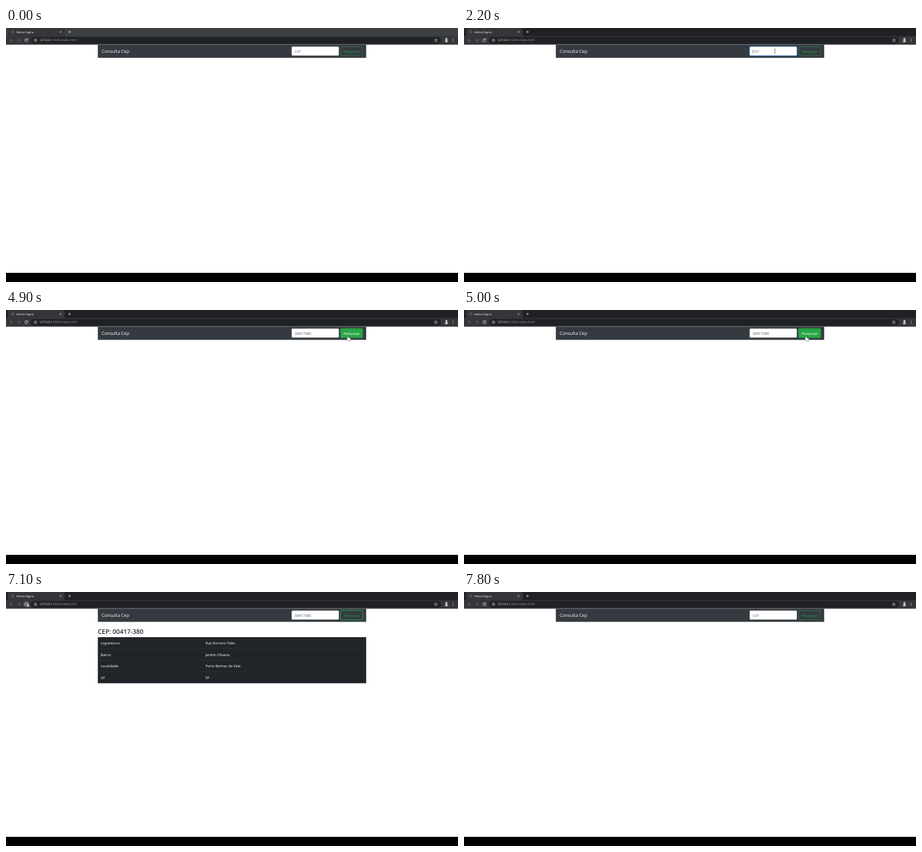
These frames come from a looping animation (690x388 px, 8700 ms). An HTML page:

```html
<!DOCTYPE html>
<html lang="pt-BR">
<head>
<meta charset="utf-8">
<title>Minha Pagina</title>
<style>
  html, body { margin: 0; width: 100%; height: 100%; overflow: hidden; background: #fff; }
  svg { display: block; width: 690px; height: 388px; }
  text { font: 5.45px "Open Sans", "Noto Sans", sans-serif; fill: #fff; text-rendering: geometricPrecision; white-space: pre; }
  .line { fill: none; stroke: #e8eaed; stroke-width: .6; }
  .dim { stroke: #77797d; }
  #strip { fill: #3c4043; }
  #controls { stroke: #85888c; }
  .active #strip { fill: #202124; }
  .active #controls { stroke: #fff; }
  #field { fill: #fff; stroke: #ced4da; stroke-width: .36; }
  #field.focus { stroke: #80bdff; }
  #button { fill: none; stroke: #28a745; stroke-width: .45; }
  #label { fill: #28a745; text-anchor: middle; }
  .hover #button { fill: #28a745; }
  .hover #label { fill: #fff; }
</style>
</head>
<body>
<svg id="stage" viewBox="0 0 690 388">
  <rect width="690" height="388" fill="#fff"/>
  <rect y="374" width="690" height="14" fill="#000"/>

  <rect id="strip" width="690" height="13"/>
  <path d="M1 12.4Q3 12.4 3 10V2.5Q3 0 5.500 0H87Q89.500 0 89.500 2.500V10Q89.500 12.400 91.500 12.400H690V25.500H0V12.400Z" fill="#35363a"/>
  <circle cx="10.200" cy="6" r="2" class="line dim"/>
  <path d="M8.800 7.300L11.600 4.700" class="line dim"/>
  <text x="16" y="7.600" style="font-size:4.12px">Minha Pagina</text>
  <path d="M82 4.700l2.700 2.700m0-2.700l-2.700 2.700M97 4v4m-2-2h4" class="line"/>
  <path id="controls" d="M646.300 5.700h3.600M663.400 4.300h3v3h-3zM664.300 4.300v-.900h3v3h-.900M680.200 4l3.400 3.400m0-3.400l-3.400 3.400" class="line" style="stroke-width:.5;stroke:inherit"/>

  <rect x="37.800" y="13.800" width="626" height="10" rx="5" fill="#202124"/>
  <path d="M11 18.700H6m2.300-2.300L6 18.700l2.300 2.300M17 18.700h5m-2.300-2.300l2.300 2.300-2.300 2.300" class="line dim"/>
  <circle id="reloadHover" cx="31" cy="18.700" r="4.900" fill="#505155"/>
  <path d="M32.700 17.300A2.200 2.200 0 1 0 33.100 19.400M33.200 16.400v1.700h-1.700" class="line" style="stroke-width:.8"/>
  <circle cx="45" cy="18.700" r="2" class="line"/>
  <path d="M45 18.400v1.400m0-2.500v.500" class="line"/>
  <text x="51" y="20.400" style="font-size:4.72px">127.0.0.1<tspan fill="#9aa0a6">:5500/index.html</tspan></text>
  <path d="M656.200 16.200l.7 1.700 1.800.1-1.400 1.200.5 1.800-1.600-1-1.600 1 .5-1.800-1.400-1.200 1.800-.1z" class="line" style="stroke-width:.5"/>
  <circle cx="672.200" cy="18.700" r="3.500" fill="#4a4548"/>
  <path d="M670.500 22c0-3 .2-3.400 1-3.700a1.500 1.700 0 1 1 1.700 0c.8.400 1 1.500 1 3.100z" fill="#c9c5c8"/>
  <path d="M682.500 16.400v4.800" stroke="#e8eaed" stroke-width=".9" stroke-dasharray=".9 1"/>

  <rect x="140.200" y="25.500" width="409.600" height="20.100" fill="#343a40"/>
  <text x="145.900" y="38.400" style="font-size:6.85px">Consulta Cep</text>
  <rect id="fieldGlow" x="435" y="27.400" width="74.200" height="15.900" rx="2.400" fill="#007bff" opacity=".4"/>
  <rect id="field" x="436.200" y="28.600" width="71.800" height="13.500" rx="1.400"/>
  <text id="value" x="440.800" y="38.100"></text>
  <path id="caret" stroke="#333" stroke-width=".4"/>
  <g id="search">
    <rect id="buttonGlow" x="510.600" y="28" width="34.200" height="14.700" rx="2" fill="none" stroke="#28a745" stroke-opacity=".6" stroke-width="1.150"/>
    <rect id="button" x="511.100" y="28.600" width="33" height="13.500" rx="1.400"/>
    <text id="label" x="527.600" y="38.100">Pesquisar</text>
  </g>

  <g id="result">
    <text x="140.200" y="64.300" style="font-size:9.65px;font-weight:600;fill:#212529">CEP: 00417-380</text>
    <rect x="140.200" y="69" width="409.600" height="70.400" fill="#212529"/>
    <path d="M140.200 86.600h409.600m-409.600 17.600h409.600m-409.600 17.600h409.600" stroke="#373b3e" stroke-width=".4"/>
    <g id="rows"></g>
  </g>

  <g id="cursor">
    <path id="arrow" d="M0 0V5.700L1.300 4.500 2.200 6.600 3.100 6.200 2.200 4.200H4Z" fill="#fff" stroke="#222" stroke-width=".4"/>
    <path id="beam" d="M-1-3.100Q0-3.100 0-2.600Q0-3.100 1-3.100M0-2.600V2.600M-1 3.100Q0 3.100 0 2.600Q0 3.100 1 3.100" fill="none" stroke="#111" stroke-width=".5"/>
    <path id="hand" d="M-.6.500Q0-.300.600.500V2.700L3 3.300Q3.800 3.600 3.600 4.500L3 7.300H-.3L-2.300 4.600Q-2-.1 3.600-.6 4.500Z" fill="#fff" stroke="#222" stroke-width=".4"/>
  </g>
</svg>
<script>
const $ = id => document.getElementById(id);
const show = (id, on) => { $(id).style.display = on ? '' : 'none'; };

const LOOP = 8700, CODE = '00417380';
const FOCUS = 2200, SUBMIT = 4800, FOUND = 5100, RELOAD = 7300, LEAVE = 7800;
const keyTimes = [2400, 2600, 2900, 3200, 3400, 3600, 3700, 3800];
// Pointer path: time, x, y
const path = [
  [1800, 686, 22], [2200, 474.6, 35.2], [4300, 474.6, 35.2], [4800, 522.8, 40],
  [5200, 522.8, 40], [5300, 555, 62], [5500, 350, 130], [5700, 163, 166],
  [5900, 270.3, 151], [6000, 340, 126], [6200, 432, 108], [6500, 270, 66],
  [6900, 31.5, 17], [7000, 32.4, 17], [7300, 32.4, 17], [7700, 640, 60], [LEAVE, 690, 65]
];

$('rows').innerHTML = [
  ['Logradouro', 'Rua Norvino Teles'],
  ['Bairro', 'Jardim Olivana'],
  ['Localidade', 'Porto Belmar do Vale'],
  ['UF', 'SP']
].map(([name, value], i) => {
  const y = 80 + 17.6 * i;
  return `<text x="144.4" y="${y}">${name}</text><text x="304.4" y="${y}">${value}</text>`;
}).join('');

function pointerAt(t) {
  const i = path.findIndex(p => p[0] > t);
  if (i < 1) return null;
  const [t0, x0, y0] = path[i - 1], [t1, x1, y1] = path[i];
  const k = (t - t0) / (t1 - t0);
  return { x: x0 + (x1 - x0) * k, y: y0 + (y1 - y0) * k };
}

const inside = (p, left, top, right, bottom) =>
  !!p && p.x >= left && p.x <= right && p.y >= top && p.y <= bottom;

function draw(t) {
  const focused = t >= FOCUS && t < SUBMIT;
  const typed = t < RELOAD ? CODE.slice(0, keyTimes.filter(k => k <= t).length) : '';
  const pointer = pointerAt(t);
  const overField = inside(pointer, 436, 28, 508, 42);
  const overButton = inside(pointer, 511, 28, 544, 42);

  $('stage').classList.toggle('active', t >= FOCUS);
  $('field').classList.toggle('focus', focused);
  $('search').classList.toggle('hover', overButton);
  show('fieldGlow', focused);
  show('buttonGlow', t >= SUBMIT && t < RELOAD);
  show('result', t >= FOUND && t < RELOAD);
  show('reloadHover', inside(pointer, 26, 13, 36, 24));

  const value = $('value');
  value.textContent = typed || 'CEP';
  value.style.fill = typed ? '#495057' : '#6c757d';
  const end = 441 + (typed ? value.getComputedTextLength() : 0);
  $('caret').setAttribute('d', `M${end} 32.800v6.200`);
  show('caret', focused);

  show('cursor', pointer);
  if (!pointer) return;
  $('cursor').setAttribute('transform', `translate(${pointer.x} ${pointer.y})`);
  show('beam', overField);
  show('hand', overButton);
  show('arrow', !overField && !overButton);
}

const start = performance.now();
function tick() {
  const t = (performance.now() - start) % LOOP;
  draw(Math.floor(t / 100) * 100);
  requestAnimationFrame(tick);
}
tick();
</script>
</body>
</html>
```
